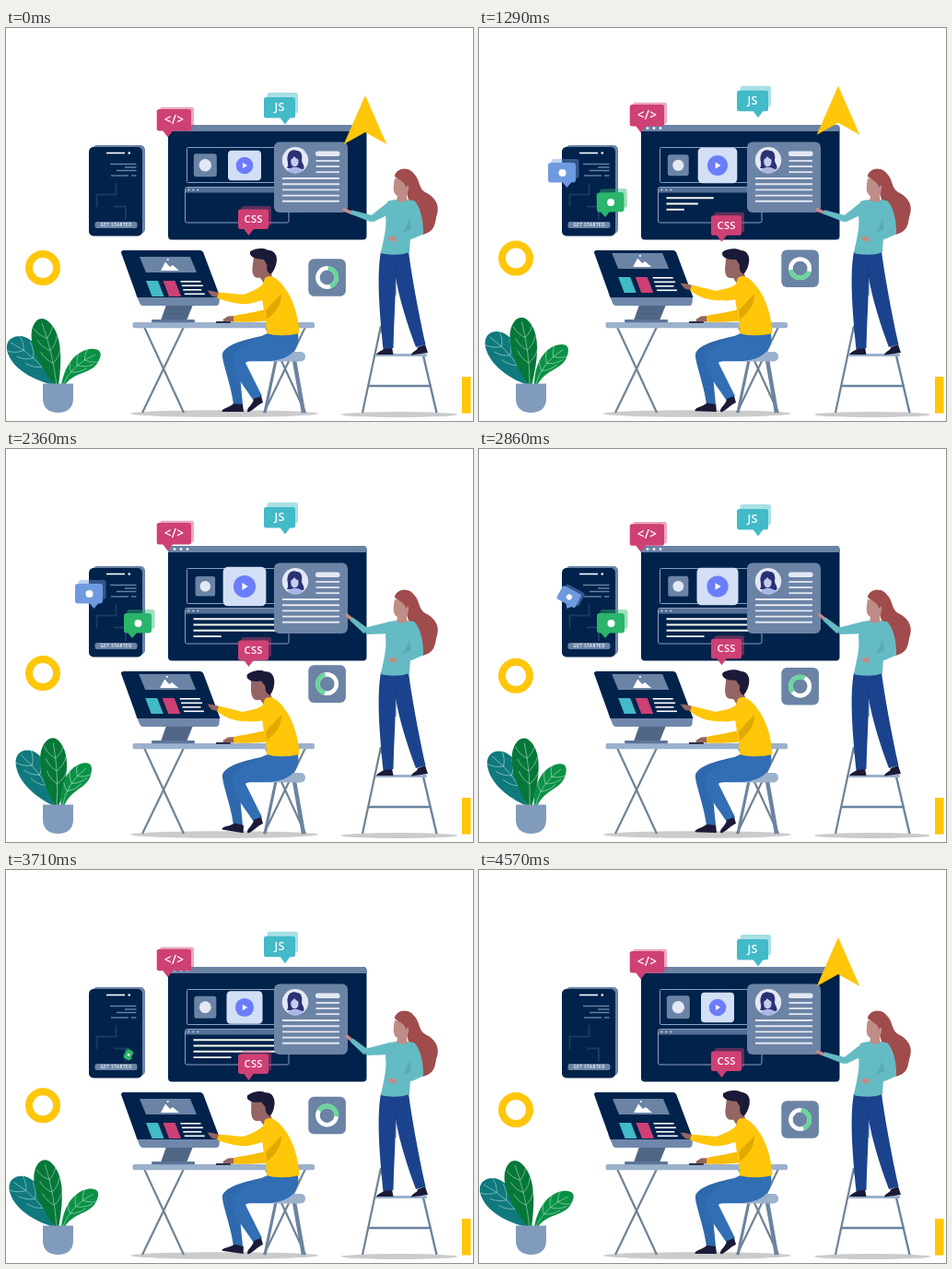
These frames come from a looping animation (507 by 426 pixels, 4.64 s). An HTML page with a canvas:

```html
<!DOCTYPE html>
<html lang="en">
<head>
<meta charset="utf-8">
<title>Team building a website</title>
<style>
html, body { margin: 0; width: 100%; height: 100%; overflow: hidden; background: #fff; }
canvas { display: block; width: 507px; height: 426px; }
</style>
</head>
<body>
<canvas id="stage"></canvas>
<script>
const W = 507, H = 426, LOOP = 4640, CYCLE = 4510;
const cv = document.getElementById('stage');
const dpr = window.devicePixelRatio || 1;
cv.width = W * dpr;
cv.height = H * dpr;
const c = cv.getContext('2d');

const NAVY = '#00224b', SLATE = '#6b83a5', STEEL = '#9bb1cc', GOLD = '#ffc60a',
  PINK = '#cf4074', TEAL = '#42bac8', PALE = '#e4e8f4', INK = '#1b1a38',
  JEANS = '#316eb4', TOP = '#65bbc3', SKIN_M = '#946562', SKIN_W = '#c08c88', HAIR = '#a04b4c';
const FONT = '"Open Sans", "Noto Sans", sans-serif';

const ramp = (t, a, b) => {
  const k = Math.min(1, Math.max(0, (t - a) / (b - a)));
  return k * k * (3 - 2 * k);
};
const mix = (a, b, k) => a + (b - a) * k;
const deg = Math.PI / 180;

function shape(color, d) {
  c.fillStyle = color;
  c.fill(new Path2D(d));
}
function poly(color, ...p) {
  c.fillStyle = color;
  c.beginPath();
  for (let i = 0; i < p.length; i += 2) c.lineTo(p[i], p[i + 1]);
  c.closePath();
  c.fill();
}
function line(color, w, ...p) {
  c.strokeStyle = color;
  c.lineWidth = w;
  c.beginPath();
  for (let i = 0; i < p.length; i += 2) c.lineTo(p[i], p[i + 1]);
  c.stroke();
}
function box(color, x, y, w, h, r = 0) {
  c.fillStyle = color;
  c.beginPath();
  c.roundRect(x, y, w, h, r);
  c.fill();
}
function frame(x, y, w, h, r) {
  c.strokeStyle = '#8ba0bf';
  c.lineWidth = 1;
  c.beginPath();
  c.roundRect(x, y, w, h, r);
  c.stroke();
}
function oval(color, x, y, rx, ry) {
  c.fillStyle = color;
  c.beginPath();
  c.ellipse(x, y, rx, ry, 0, 0, 7);
  c.fill();
}
const dot = (color, x, y, r) => oval(color, x, y, r, r);

function label(s, x, y, size, gap = 0) {
  c.font = `600 ${size}px ${FONT}`;
  c.letterSpacing = gap + 'px';
  c.textAlign = 'center';
  c.textBaseline = 'middle';
  c.fillStyle = '#fff';
  c.fillText(s, x + gap / 2, y);
}
// Draw with a turn and scale around a pivot
function pivot(x, y, angle, scale, fn) {
  c.save();
  c.translate(x, y);
  c.rotate(angle * deg);
  c.scale(scale, scale);
  c.translate(-x, -y);
  fn();
  c.restore();
}

function phone() {
  box(SLATE, 94, 127, 57, 96, 5);
  box(NAVY, 90, 129, 58, 96.5, 5);
  line('#fff', 1.6, 109, 135.5, 129, 135.5);
  dot('#fff', 133.8, 135.5, 1.3);
  for (const [a, b, y] of [[113, 141.5, 147.5], [129, 141.5, 151], [120, 141.5, 154.5], [114, 133, 160], [136, 141.5, 160]])
    line(SLATE, 1.4, a, y, b, y);
  line('#183a63', 2, 119.5, 168, 119.5, 180.5, 98.5, 180.5, 98.5, 194);
  line('#183a63', 2, 117, 193.5, 130, 193.5, 130, 208);
  box(SLATE, 96.5, 210, 46, 7, 2.5);
  label('GET STARTED', 119.5, 213.7, 4.5, 0.55);
}

// x, y is the tail tip; left is the panel's reach to its left
function appBadge(x, y, left, color, s, turn) {
  if (s < 0.02) return;
  pivot(x, y, turn * (1 - s), s, () => {
    c.globalAlpha = 0.45;
    box(color, x - left + 3.5, y - 31, 30, 21, 3);
    c.globalAlpha = 1;
    box(color, x - left, y - 27, 30, 21.5, 3);
    poly(color, x - 5, y - 6, x + 5, y - 6, x, y);
    dot('#fff', x - left + 15.5, y - 16, 4);
  });
}

function tag(text, x, y, w, h, color, back, tail, size) {
  c.globalAlpha = 0.45;
  box(color, x + 3.5, y - back, w - 0.5, h, 2.5);
  c.globalAlpha = 1;
  box(color, x, y, w, h, 2.5);
  poly(color, x + tail - 6, y + h - 1, x + tail + 6, y + h - 1, x + tail, y + h + 7);
  label(text, x + w / 2, y + h / 2 + 0.6, size, 0.2);
}

function avatar() {
  c.save();
  dot(PALE, 314, 143.3, 14.2);
  c.beginPath();
  c.arc(314, 143.3, 14.2, 0, 7);
  c.clip();
  shape('#2a3174', 'M305 152 C308 147 304 143 306 138 C307 133 312 131 316 133 C321 133 322 139 321 143 C321 147 325 149 323 153Z');
  shape('#aab7e6', 'M303 160 C303 154 308 153 311 151 L317 151 C320 153 326 154 326 160Z');
  oval('#c3cdf0', 313.4, 144.5, 4.2, 6);
  shape('#2a3174', 'M308 143 C308 136 318 135 319 143 C315 142 314 140 313 139 C312 141 310 142 308 143Z');
  c.restore();
}

function website(t, wave) {
  box(NAVY, 176, 105, 215.5, 124.5, 4);
  box(SLATE, 176, 105, 215.5, 7, [4, 4, 0, 0]);
  for (let i = 0; i < 3; i++) dot('#fff', 183 + i * 7, 108.6, 1.4);

  frame(196.5, 129.5, 100, 38, 1);
  pivot(216.3, 148.8, 0, 0.93 + 0.07 * wave, () => {
    box(SLATE, 203.8, 136.3, 25, 25, 3);
    dot(PALE, 216.3, 148.8, 6.7);
  });
  pivot(259, 149, 0, 1.15 - 0.15 * wave, () => {
    box('#d3dff5', 241, 132.7, 36, 32.6, 4);
    dot('#6c7dfb', 259, 149, 9.3);
    poly('#fff', 257, 146, 262, 149, 257, 152);
  });

  frame(194.5, 172.5, 112.5, 38.5, 2);
  box('#566f94', 195, 173, 112, 5.5, [2, 2, 0, 0]);
  for (let i = 0; i < 3; i++) dot('#d8e0ee', 198.3 + i * 5, 175.4, 0.9);
  c.globalAlpha = 1 - ramp(t, 3850, 4300);
  [[560, 90], [800, 90], [1015, 90], [1930, 41]].forEach(([start, max], i) => {
    const len = Math.min(max, (t - start) * 0.07);
    if (len > 0) line('#fbfaf0', 1.9, 203.5, 184.2 + i * 6.3, 203.5 + len, 184.2 + i * 6.3);
  });
  c.globalAlpha = 1;

  box(SLATE, 291, 123.5, 80, 76.5, 6);
  avatar();
  box(PALE, 336, 133.5, 26.5, 5.5, 2.5);
  for (let i = 0; i < 3; i++) line(PALE, 1.8, 336.5, 144 + i * 6.1, 362, 144 + i * 6.1);
  for (let i = 0; i < 5; i++) line(PALE, 1.9, 300, 163 + i * 6.2, 362, 163 + i * 6.2);
}

function cursor(t) {
  const rise = Math.max(0, (t - 1217) * 0.138);
  const back = t > 3500;
  const turn = -90 * (ramp(t, 60, 520) - ramp(t, 680, 1140));
  c.save();
  c.translate(390, back ? 100 : 100 - rise);
  c.rotate(turn * deg);
  if (back) {
    const s = ramp(t, 3800, 4300);
    c.scale(s, s);
  }
  poly(GOLD, 0, -27, 23.3, 26, 0, 13, -23.3, 26);
  c.restore();
}

function chart(phase, y) {
  const a = phase - 85 * deg, x = 348.6;
  box(SLATE, 328.3, y - 20.3, 40.6, 40.6, 6);
  c.lineWidth = 4.6;
  c.strokeStyle = '#fff';
  c.beginPath();
  c.arc(x, y, 10.2, 0, 7);
  c.stroke();
  c.strokeStyle = '#67d79a';
  c.beginPath();
  c.arc(x, y, 10.2, a, a + 155 * deg);
  c.stroke();
}

// A leaf outline with a curved rib from base to tip and bent side veins
function leaf(color, d, rib, angle) {
  pivot(rib[0], rib[1], angle, 1, () => {
    const [x0, y0, x1, y1, x2, y2] = rib;
    const p = new Path2D(d);
    c.fillStyle = color;
    c.fill(p);
    c.clip(p);
    c.strokeStyle = 'rgba(226,246,236,.65)';
    c.lineWidth = 0.7;
    c.beginPath();
    c.moveTo(x0, y0);
    c.quadraticCurveTo(x1, y1, x2, y2);
    for (let k = 0.35; k < 0.9; k += 0.2) {
      const q = 1 - k;
      const x = q * q * x0 + 2 * q * k * x1 + k * k * x2;
      const y = q * q * y0 + 2 * q * k * y1 + k * k * y2;
      const dir = Math.atan2(q * (y1 - y0) + k * (y2 - y1), q * (x1 - x0) + k * (x2 - x1));
      for (const side of [-1, 1]) {
        const at = (r, bend) => [x + r * Math.cos(dir + side * bend), y + r * Math.sin(dir + side * bend)];
        c.moveTo(x, y);
        c.quadraticCurveTo(...at(9, 1), ...at(18, 0.65));
      }
    }
    c.stroke();
  });
}

function plant(wave) {
  const a = (1 - wave) / 2 * 11;
  leaf('#0f797d', 'M53 387 C36 384 11 373 3 355 C-3 342 4 333 17 334 C36 339 47 360 53 387Z', [53, 387, 35, 356, 5, 341], a * 1.15);
  leaf('#057839', 'M54 388 C38 370 25 345 28 328 C31 314 40 312 47 319 C59 330 62 353 57 388Z', [55, 388, 51, 352, 39, 320], a * 0.93);
  leaf('#0a9145', 'M60 388 C63 367 75 350 91 348 C102 347 106 352 100 362 C92 376 75 371 63 388Z', [61, 388, 72, 364, 97, 354], -a * 1.35);
  shape('#819bbd', 'M40 385.5 H73 V402 C73 412 66 417 56.5 417 C47 417 40 412 40 402Z');
}

function trestle(x) {
  line('#6f8294', 2.2, x + 2, 324, x + 45, 417);
  line('#6f8294', 2.2, x + 45, 324, x, 417);
}

function desk(up) {
  oval('#cbcbcb', 237, 418, 102, 3.8);
  trestle(148);
  trestle(280);
  line('#6b83a0', 3.2, 293, 360, 281, 417);
  line('#6b83a0', 4.4, 313, 360, 323, 417);
  box(STEEL, 279, 351, 46, 10.5, 5);
  box(STEEL, 137.5, 319, 197.5, 6.3, 2);

  poly('#4f6685', 174, 300, 203, 300, 196, 317, 168, 317);
  box('#5d7598', 158, 316, 47, 3.2, 1);
  shape('#6f87aa', 'M140 286 L143.5 292 L232 291 L231.5 298 Q231 301 228 301 L149 301 Q146 301 145 298Z');
  shape(NAVY, 'M127.5 241 H211 Q213.3 241 214.3 243.5 L232.5 292 H142.5 L125 243.5 Q125 241 127.5 241Z');
  c.save();
  c.translate(-0.8 * up, -4 * up);
  poly(SLATE, 145, 248, 200, 248, 207, 265, 152, 265);
  poly('#fff', 168, 263, 173, 253.5, 178, 259, 181, 257, 188, 263);
  dot('#fff', 175.7, 251, 1.1);
  poly(TEAL, 152, 274, 165, 274, 171.5, 291, 158.5, 291);
  poly(PINK, 170.5, 274, 183.5, 274, 190, 291, 177, 291);
  [22, 23, 20, 22].forEach((w, i) => line('#fff', 1.6, 189.5 + i * 1.4, 274.8 + i * 4.5, 189.5 + i * 1.4 + w, 274.8 + i * 4.5));
  c.restore();
  box(INK, 228, 318, 16, 1.7, 0.5);
}

function man(t, up) {
  const nod = Math.cos(t / LOOP * 6 * Math.PI), lift = (1 - nod) / 2;
  shape('#2e69ad', 'M290 332 C262 336 238 343 235 353 C234 361 244 385 247 408 L257 408 C256 394 253 376 255 364 L290 350Z');
  pivot(257, 414, 9 * lift, 1, () =>
    shape(INK, 'M247 407 L257 408 L258 416 L234.5 416 C234 412 242 412 247 407Z'));
  shape(JEANS, 'M317 331 C320 350 306 360 285 361 C272 362 262 360 260 363 L278 399 L269 404 C257 386 245 373 246 359 C248 346 268 338 284 331Z');
  shape(INK, 'M269 402 L277 399 L279 406 C273 408 270 414 262.5 416.5 C260 412 268 409 269 402Z');

  pivot(285, 273, -1.5 + 3.5 * nod, 1, () => {
    shape(SKIN_M, 'M268 249 L267 261 C267 268 269 272 276 271 L280 277 L290 274 L287 262 L283 250Z');
    shape(INK, 'M264 243 C269 239 279 238 284 241 C291 241 294 247 293 254 C292 260 290 264 287 267 C284 265 282 262 283 257 L279 251 C274 251 267 251 264 246Z');
  });

  shape(SKIN_M, 'M249 312 L241 312.5 L235.5 316 L236 318 L248 318.5Z');
  shape('#f9bd05', 'M292 301 C284 306 262 309 247 312 L247 318.5 C262 319 282 319 294 315Z');
  shape(GOLD, 'M281 271 C283 269 288 268 290 270 C296 273 299 277 302 281 C312 293 318 315 318.5 331 C306 334 292 334 283 331 C283 316 278 300 278 290 C278 282 279 276 281 271Z');
  shape('#e0a900', 'M299 288 L282 306 L283 316 C292 309 299 301 299 288Z');

  const d = -8 * up, e = d * 0.5;
  shape(SKIN_M, `M232 ${287 + d} L224 ${285 + d} L218.5 ${284.5 + d} L221 ${288 + d} L224 ${291 + d} L231 ${292 + d}Z`);
  shape(GOLD, `M282 275 C274 283 264 ${287 + e} 257 ${289 + e} L231 ${286.5 + d} L229 ${292.5 + d} C240 ${297 + e} 254 ${300 + e} 262 ${299 + e} C274 297 288 293 291 286Z`);
}

function ladder() {
  oval('#cbcbcb', 427, 419, 63, 3);
  line('#6f8294', 1.8, 407, 324, 414, 354);
  line('#6f8294', 2.2, 407, 323, 387, 417);
  line('#6b83a0', 2.4, 453, 355, 467.5, 417);
  line('#6b83a0', 2.4, 394, 388, 462, 388);
  box(STEEL, 401, 353, 56, 3, 1);
}

function woman(t) {
  const tilt = ramp(t, 60, 560) - ramp(t, 680, 1270);
  const raise = ramp(t, 1700, 2320) - ramp(t, 3720, 4300);
  const head = fn => pivot(432, 187, -10 * tilt, 1, fn);

  head(() => shape(HAIR, 'M422 160 C424 152 436 150 442 157 C450 164 447 173 455 178 C466 183 471 192 468 202 C465 210 468 220 452 224 C447 218 456 210 449 203 C440 195 436 185 435 178 C436 170 428 164 422 160Z'));
  shape(INK, 'M419 346 L420.5 354 H402 C404 350 410 350 411 346Z');
  shape(INK, 'M455 343 L458 352 L440 354.5 C441 350 447 350 447 346Z');
  shape('#1b438d', 'M407 242 H437 C440 265 447 305 455.5 343 L445 346 C436 322 427 294 423 270 C423 295 421 320 420.5 347 L409.5 348 C406 312 402 270 407 242Z');
  line('#163a80', 0.8, 423, 258, 423, 290);

  // Pointing arm
  const hx = mix(367, 370, raise), hy = mix(197, 180, raise);
  const ex = mix(398, 391, raise), ey = mix(207, 197.5, raise);
  const dx = ex - hx, dy = ey - hy;
  const wx = hx + dx * 0.24, wy = hy + dy * 0.24;
  c.lineCap = 'round';
  line(SKIN_W, 3.6, hx, hy, wx + 1, wy + 1);
  c.lineCap = 'butt';
  const n = Math.hypot(dx, dy), nx = -dy / n, ny = dx / n;
  poly(TOP, wx - nx * 2.3, wy - ny * 2.3, ex - nx * 3.6, ey - ny * 3.6, ex + nx * 3.6, ey + ny * 3.6, wx + nx * 2.3, wy + ny * 2.3);
  const ax = mix(ex, 417, tilt), ay = mix(ey, 196, tilt);
  poly(TOP, ax - 2, ay - 3.6, 417, 187, 420, 200, ax, ay + 3.6);

  shape(TOP, 'M414 188 C422 185 438 185 444 188 C449 200 444 215 439 228 L438 243 C428 247 414 246 407 244 C409 232 414 217 412 203Z');
  head(() => {
    shape(SKIN_W, 'M422 163 C428 164 434 164 437 170 C438 176 435 180 435 184 L436 187 Q430 190 424 187 L425 182 C420 180 420 173 422 163Z');
    shape(HAIR, 'M422 161 C424 152 436 150 442 157 L444 170 C441 175 439 178 436 181 C437 178 440 174 438 171 C436 170 435 172 434 173 C434 167 427 165 422 161Z');
  });

  // Resting arm
  const mx = -10 * tilt, my = -11 * tilt, lx = -6 * tilt, ly = -8 * tilt;
  shape(SKIN_W, `M${425 + mx} ${226 + my} L${417 + mx} ${226 + my} L${414 + mx} ${228 + my} L${418 + mx} ${231 + my} L${425 + mx} ${231.5 + my}Z`);
  shape('#58aab4', `M438 207 L${440 + lx} ${218 + ly} L${426 + mx} ${225 + my} L${431 + mx} ${223 + my}Z`);
  shape(TOP, `M442 187 C450 190 ${454 + lx} ${214 + ly} ${453 + lx} ${223 + ly} C${445 + lx} ${228 + ly} ${436 + lx} ${231 + ly} ${424 + mx} ${231.5 + my} L${423 + mx} ${226 + my} L${441 + lx} ${218 + ly} L438 203Z`);
}

function draw(t) {
  const phase = Math.min(1, t / CYCLE) * 2 * Math.PI;
  const wave = Math.cos(phase);
  const up = ramp(t, 80, 560) - ramp(t, 3100, 3640);
  c.setTransform(dpr, 0, 0, dpr, 0, 0);
  c.fillStyle = '#fff';
  c.fillRect(0, 0, W, H);

  phone();
  appBadge(95.5, 173, 20.5, '#6f9adf', ramp(t, 130, 670) - ramp(t, 2630, 3360), 120);
  appBadge(137, 205, 9, '#2ab56b', ramp(t, 720, 1330) - ramp(t, 3350, 3950), -95);
  website(t, wave);
  tag('</>', 163.7, 84 + 4 * wave, 37.3, 23.5, PINK, 2.3, 12, 13.5);
  tag('JS', 280, 69 + 6 * wave, 34, 22.5, TEAL, 5, 23, 12.5);
  tag('CSS', 252, 202 - 5.5 * wave, 33, 21.5, PINK, 3.5, 11.5, 11.2);
  cursor(t);
  chart(phase, 262.5 + 8 * wave);

  c.strokeStyle = GOLD;
  c.lineWidth = 8;
  c.beginPath();
  c.arc(40, 251.5 + 8.5 * wave, 15, 0, 7);
  c.stroke();
  box(GOLD, 495, 378, 9.6, 39.6);

  plant(wave);
  desk(up);
  man(t, up);
  ladder();
  woman(t);
}

const begin = performance.now();
function tick() {
  draw((performance.now() - begin) % LOOP);
  requestAnimationFrame(tick);
}
tick();
</script>
</body>
</html>
```
